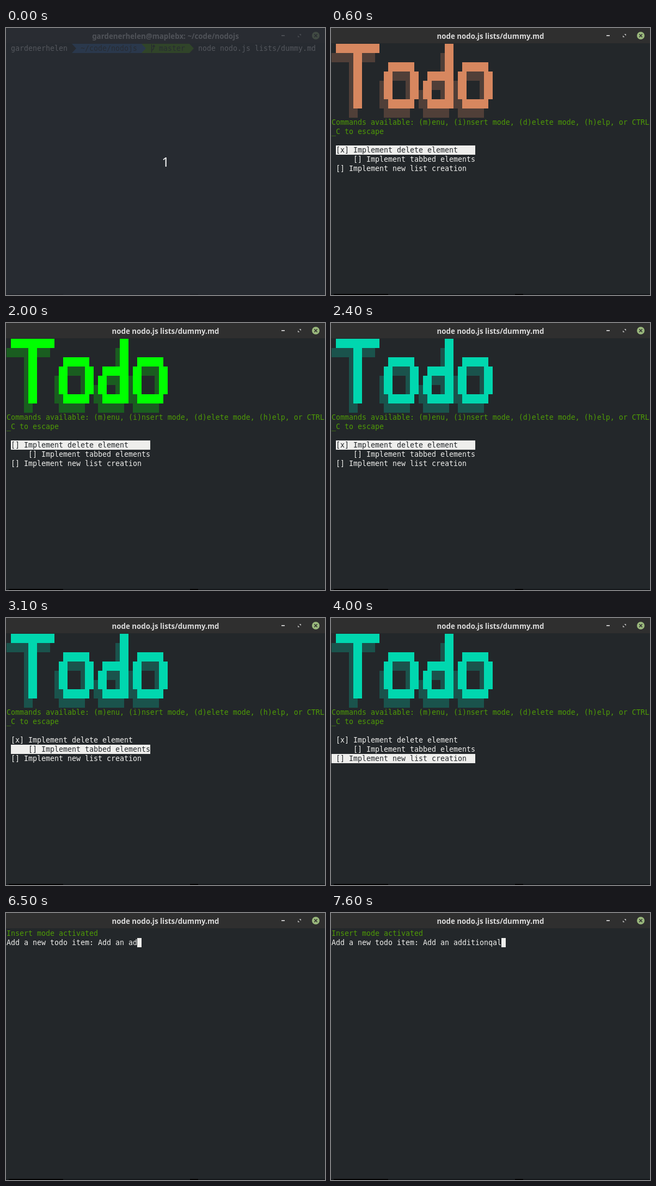
Animation, 586 px wide and 491 px high, one loop 8 s. Source, as an HTML page:

```html
<!DOCTYPE html>
<html lang="en">
<head>
<meta charset="utf-8">
<title>Todo terminal</title>
<style>
  html, body { margin: 0; width: 100%; height: 100%; overflow: hidden; background: #23272a; }
  #win { position: relative; width: 586px; height: 491px; overflow: hidden; background: #23272a; }
  #win > * { position: absolute; }
  #bar { left: 0; top: 0; width: 586px; height: 28px; background: #2f2f2f; }
  #title { left: 0; top: 1px; width: 586px; text-align: center; color: #dadada;
    font: bold 13.333px/28px "Noto Sans", "Open Sans", sans-serif; white-space: pre; }
  svg { left: 0; top: 0; }
  .scene { left: 0; top: 0; width: 586px; height: 491px; }
  .t { position: absolute; height: 17px; white-space: pre; color: #eeeeec;
    font: 13.29px/17px "DejaVu Sans Mono", "Liberation Mono", monospace; }
  .green { color: #4e9a06; }
  .dark { color: #23272a; }
  .sel { background: #eeeeec; color: #23272a; }
  #cursor { width: 8px; height: 17px; background: #eeeeec; }
  #count { left: 0; top: 0; width: 586px; height: 491px; background: rgba(40, 44, 52, .78); }
  #count span { position: absolute; left: 0; top: 229px; width: 586px; text-align: center;
    color: #f4f4f4; font: 24px/33px "Noto Sans", "Open Sans", sans-serif; }
</style>
</head>
<body>
<div id="win">
  <div id="bar"></div>
  <div id="title"></div>
  <svg width="586" height="491">
    <path d="M506 14h6" stroke="#c4c4c4" stroke-width="2"/>
    <path d="M538.5 11h3.5v3.5zM536 13.5v3.5h3.5z" fill="#b4b4b4"/>
    <circle cx="569" cy="14" r="7" fill="#9ab87c"/>
    <path d="M566.3 11.3l5.4 5.4m0-5.4l-5.4 5.4" stroke="#2f2f2f" stroke-width="1.6"/>
    <path d="M0 490h586" stroke="#14171a" stroke-width="2"/>
    <path d="M5 490h100m233 0h15" stroke="#000" stroke-width="2"/>
  </svg>
  <div class="scene" id="prompt">
    <svg width="586" height="60" style="position:absolute">
      <path d="M249 29h88l8 8.5l-8 8.5h-88z" fill="#4e9a06"/>
      <path d="M121 29h128l8 8.5l-8 8.5h-128l8-8.5z" fill="#3465a4"/>
      <path d="M267.5 30v15M267.5 41q4-1 4-6v-2M269.5 34.5l2-3l2 3" fill="none" stroke="#23272a" stroke-width="1.4"/>
    </svg>
  </div>
  <div class="scene" id="list">
    <svg width="586" height="491" style="position:absolute">
      <path id="shade" opacity=".25" transform="translate(-8 17)"/>
      <path id="gap" fill="#23272a"/>
      <path id="face"/>
    </svg>
    <div id="items"></div>
  </div>
  <div class="scene" id="insert"></div>
  <div id="cursor"></div>
  <div id="count"><span>1</span></div>
</div>
<script>
const LOOP = 8000, COMMAND = 'node nodo.js lists/dummy.md';
const $ = id => document.getElementById(id);
const colX = c => 1 + 8 * c;
const rowY = r => 29 + 17 * r;

function put(parent, col, row, text, cls = '') {
  const el = document.createElement('div');
  el.className = 't ' + cls;
  el.style.left = colX(col) + 'px';
  el.style.top = rowY(row) + 'px';
  el.textContent = text;
  parent.append(el);
  return el;
}

// Block letters; the shadow is the same shape one cell down and left
const letters = [
  ' ##########               ##',
  '     ##                   ##',
  '     ##      ######       ##  ######',
  '     ##     ##    ##  ###### ##    ##',
  '     ##     ##    ## ##   ## ##    ##',
  '     ##     ##    ## ##   ## ##    ##',
  '     ##      ######   ######  ######'
];
const shape = letters.map((line, r) =>
  [...line.matchAll(/#+/g)].map(m =>
    `M${colX(m.index)} ${rowY(r)}h${8 * m[0].length}v17h${-8 * m[0].length}z`).join('')).join('');
for (const id of ['shade', 'gap', 'face']) $(id).setAttribute('d', shape);

put($('prompt'), 1, 0, 'gardenerhelen');
put($('prompt'), 17, 0, '~/code/nodojs', 'dark');
put($('prompt'), 35, 0, 'master', 'dark');
put($('prompt'), 44, 0, COMMAND);

put($('list'), 0, 8, 'Commands available: (m)enu, (i)nsert mode, (d)elete mode, (h)elp, or CTRL', 'green');
put($('list'), 0, 9, '_C to escape', 'green');
const items = [0, 1, 2].map(i => put($('items'), 1, 11 + i, ''));

put($('insert'), 0, 0, 'Insert mode activated', 'green');
put($('insert'), 0, 1, 'Add a new todo item: ');
const entry = put($('insert'), 21, 1, '');

// Each step changes only the listed fields
const steps = [
  [0, { scene: 'prompt', count: true, on: false, done: true, pick: 0, ink: '#d7875f', text: '' }],
  [200, { count: false }],
  [400, { on: true }],
  [600, { scene: 'list', on: false }],
  [1000, { on: true }],
  [1600, { on: false }],
  [2000, { done: false, ink: '#00ff00' }],
  [2400, { done: true, ink: '#00d7af' }],
  [2900, { on: true }],
  [3100, { pick: 1, on: false }],
  [3500, { pick: 2 }],
  [4000, { on: true }],
  [4100, { scene: 'insert' }],
  [4600, { on: false }],
  [5200, { on: true }],
  [5500, { text: 'A' }],
  [5800, { text: 'Add' }],
  [6000, { text: 'Add a' }],
  [6100, { text: 'Add an' }],
  [6400, { text: 'Add an a' }],
  [6500, { text: 'Add an ad' }],
  [6700, { text: 'Add an addi' }],
  [6900, { text: 'Add an additi' }],
  [7100, { text: 'Add an additio' }],
  [7300, { text: 'Add an additionqa' }],
  [7400, { text: 'Add an additionqal ' }],
  [7600, { text: 'Add an additionqal' }]
];
const states = [];
steps.forEach(([, change], i) => states.push({ ...states[i - 1], ...change }));

function draw(s) {
  for (const id of ['prompt', 'list', 'insert']) $(id).style.display = id === s.scene ? '' : 'none';
  $('title').textContent = s.scene === 'prompt' ? 'gardenerhelen@maplebx: ~/code/nodojs' : COMMAND;
  $('count').style.display = s.count ? '' : 'none';

  $('shade').setAttribute('fill', s.ink);
  $('face').setAttribute('fill', s.ink);
  const lines = [
    (s.done ? '[x]' : '[]') + ' Implement delete element',
    '    [] Implement tabbed elements',
    '[] Implement new list creation'
  ];
  items.forEach((el, i) => {
    el.textContent = lines[i].padEnd(32);
    el.className = i === s.pick ? 't sel' : 't';
  });
  entry.textContent = s.text;

  const [col, row] = { prompt: [71, 0], list: [0, 11 + s.pick], insert: [21 + s.text.length, 1] }[s.scene];
  Object.assign($('cursor').style, {
    left: colX(col) + 'px', top: rowY(row) + 'px', display: s.on ? '' : 'none'
  });
}

let shown = -1;
const start = performance.now();
function tick(now) {
  const t = Math.max(0, now - start) % LOOP;
  const i = steps.findLastIndex(([at]) => at <= t);
  if (i !== shown) draw(states[shown = i]);
  requestAnimationFrame(tick);
}
tick(start);
</script>
</body>
</html>
```
